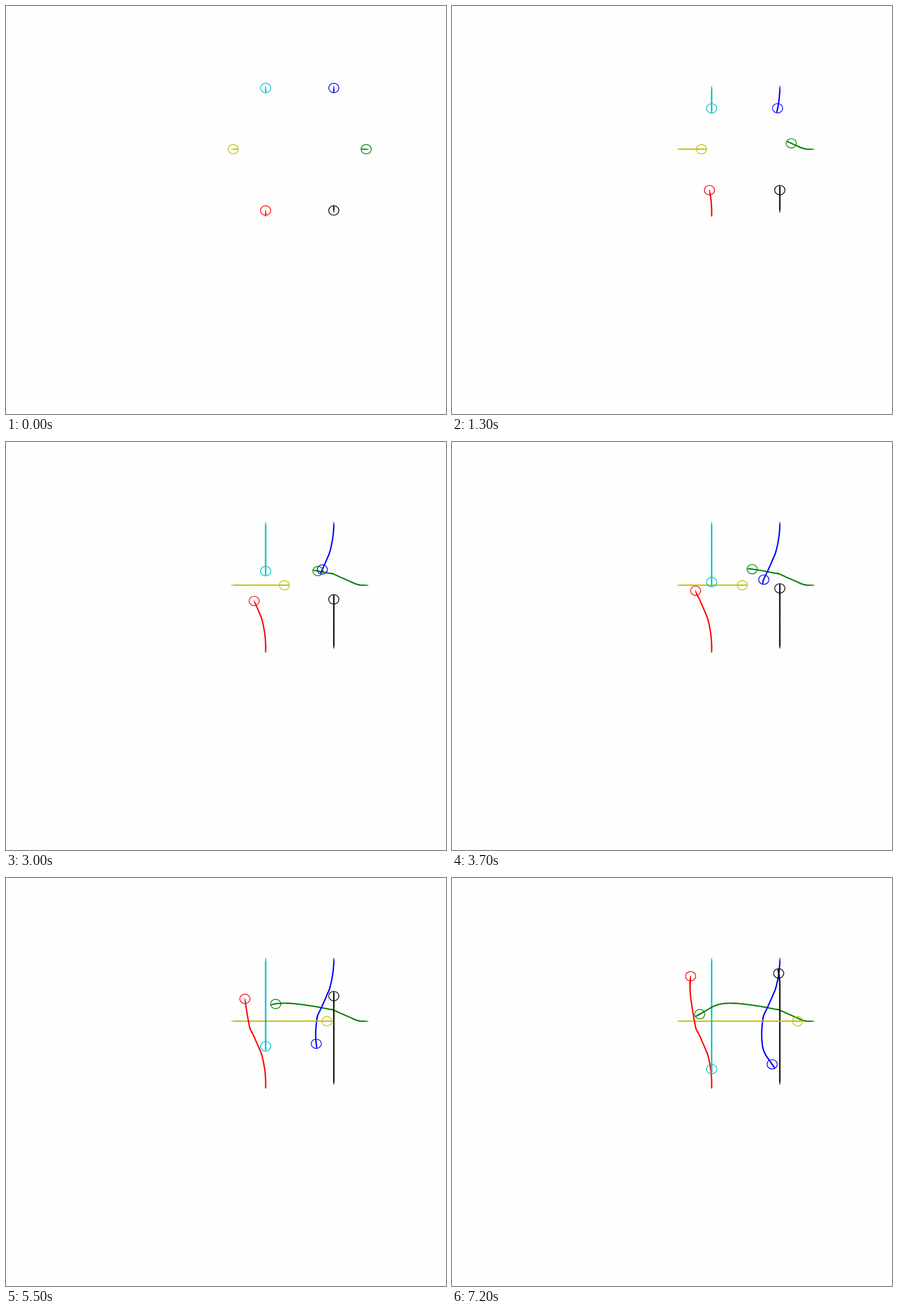
Animation, 777 px wide and 721 px high, one loop 7300 ms. Source, as an HTML page with a canvas:

```html
<!DOCTYPE html>
<html lang="en">
<head>
<meta charset="utf-8">
<title>Crossing robots</title>
<style>
  html, body { margin: 0; width: 100%; height: 100%; overflow: hidden; background: #fefefe; }
  canvas { display: block; }
</style>
</head>
<body>
<canvas id="stage" width="777" height="721"></canvas>
<script>
const ctx = document.getElementById('stage').getContext('2d');

// World origin in pixels, and pixels per world unit on each axis.
const CX = 518.7, CY = 253.1, SX = 60.2, SY = 55.5;
const STEP_MS = 100, STEPS = 73, CRUISE_STEPS = 65;
const STRIDE = 0.05, BRAKING = 0.07;
const RADIUS = 0.15, SHAFT = 0.1, HEAD = 0.03, HEAD_HALF = 0.01;
const RIGHT = 0, DOWN = Math.PI / 2, LEFT = Math.PI, UP = -Math.PI / 2;

// Steering keys: [strides driven, deflection from the straight course].
const swerve = [[0, 0], [18, 0.24], [21, 0.36], [36, 0.42], [39, 0.18]];

const robots = [
  { color: '#0000ff', x: 1, y: -2, course: DOWN, steer: [...swerve, [56, -0.1], [65, -0.56]] },
  { color: '#008000', x: 2, y: 0, course: LEFT,
    steer: [[2, 0], [8, 0.42], [20, 0.47], [22, 0.24], [44, 0.12], [53, -0.05], [63, -0.55]] },
  { color: '#ff0000', x: -1, y: 2, course: UP, side: -1, reverse: true,
    steer: [...swerve, [56, 0.12], [70, -0.09]] },
  { color: '#00bfbf', x: -1, y: -2, course: DOWN },
  { color: '#bfbf00', x: -2, y: 0, course: RIGHT },
  { color: '#000000', x: 1, y: 2, course: UP, side: -1, steer: [[62, 0], [70, 0.15]] }
];

function deflection(keys, s) {
  const next = keys.findIndex(([at]) => at > s);
  if (next === 0) return keys[0][1];
  if (next < 0) return keys[keys.length - 1][1];
  const [s0, a0] = keys[next - 1], [s1, a1] = keys[next];
  return a0 + (a1 - a0) * (s - s0) / (s1 - s0);
}

// Drive one robot: steady pace, then braking over the last steps.
function drive({ x, y, course, side = 1, reverse = false, steer = [[0, 0]] }) {
  const heading = s => course + side * deflection(steer, s);
  const poses = [];
  let s = 0;
  for (let step = 0; step <= STEPS; step++) {
    poses.push({ x, y, angle: heading(s) + (reverse ? Math.PI : 0) });
    const pace = 1 - BRAKING * Math.max(0, step + 1 - CRUISE_STEPS);
    const angle = heading(s + pace / 2);
    x += STRIDE * pace * Math.cos(angle);
    y += STRIDE * pace * Math.sin(angle);
    s += pace;
  }
  return poses;
}

function drawArrow({ x, y, angle }) {
  const c = Math.cos(angle), s = Math.sin(angle);
  const place = (along, across) =>
    [CX + (x + along * c - across * s) * SX, CY + (y + along * s + across * c) * SY];
  ctx.beginPath();
  ctx.moveTo(...place(0, 0));
  ctx.lineTo(...place(SHAFT, 0));
  ctx.stroke();
  ctx.beginPath();
  ctx.moveTo(...place(SHAFT, HEAD_HALF));
  ctx.lineTo(...place(SHAFT + HEAD, 0));
  ctx.lineTo(...place(SHAFT, -HEAD_HALF));
  ctx.closePath();
  ctx.fill();
  ctx.stroke();
}

function drawBody({ x, y }) {
  ctx.beginPath();
  ctx.ellipse(CX + x * SX, CY + y * SY, RADIUS * SX, RADIUS * SY, 0, 0, Math.PI * 2);
  ctx.stroke();
}

for (const robot of robots) robot.poses = drive(robot);

function render(time) {
  const last = Math.floor(time / STEP_MS) % STEPS + 1;
  ctx.fillStyle = '#fefefe';
  ctx.fillRect(0, 0, 777, 721);
  ctx.lineWidth = 1.39;
  ctx.lineCap = 'square';
  // Later marks lie over earlier ones, whichever robot left them.
  for (let step = 0; step <= last; step++) {
    for (const { color, poses } of robots) {
      ctx.fillStyle = ctx.strokeStyle = color;
      drawArrow(poses[step]);
      if (step === last) drawBody(poses[step]);
    }
  }
}

let start;
function tick(now) {
  start ??= now;
  render(now - start);
  requestAnimationFrame(tick);
}
render(0);
requestAnimationFrame(tick);
</script>
</body>
</html>
```
